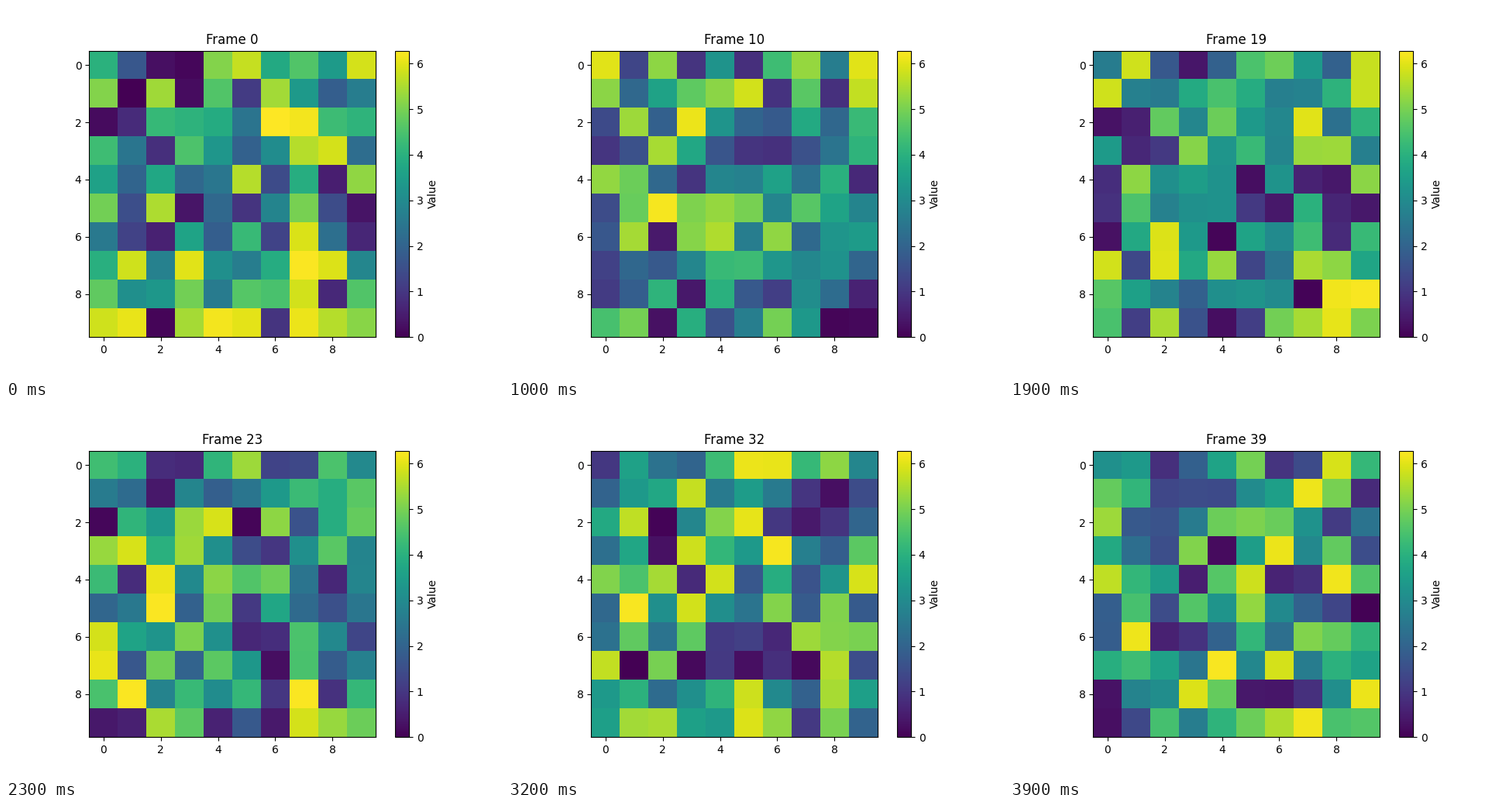
These frames come from a looping animation (640 by 480 pixels, 4 s). A matplotlib script:

```python
import numpy as np
import matplotlib.pyplot as plt
from matplotlib.animation import FuncAnimation

SIZE = 10
FRAMES = 40
INTERVAL = 100
TOP = 2 * np.pi


def phases(i):
    """Independent uniform phases, repeatable for each step."""
    return np.random.default_rng(i).uniform(0, TOP, (SIZE, SIZE))


fig, ax = plt.subplots(figsize=(6.4, 4.8), dpi=100)
image = ax.imshow(phases(0), cmap="viridis", vmin=0, vmax=TOP)
fig.colorbar(image, ax=ax, label="Value")
title = ax.set_title("Frame 0")


def update(i):
    image.set_data(phases(i))
    title.set_text(f"Frame {i}")
    return image, title


anim = FuncAnimation(fig, update, frames=FRAMES, interval=INTERVAL,
                     repeat=True, repeat_delay=0, blit=False)
plt.show()
```
